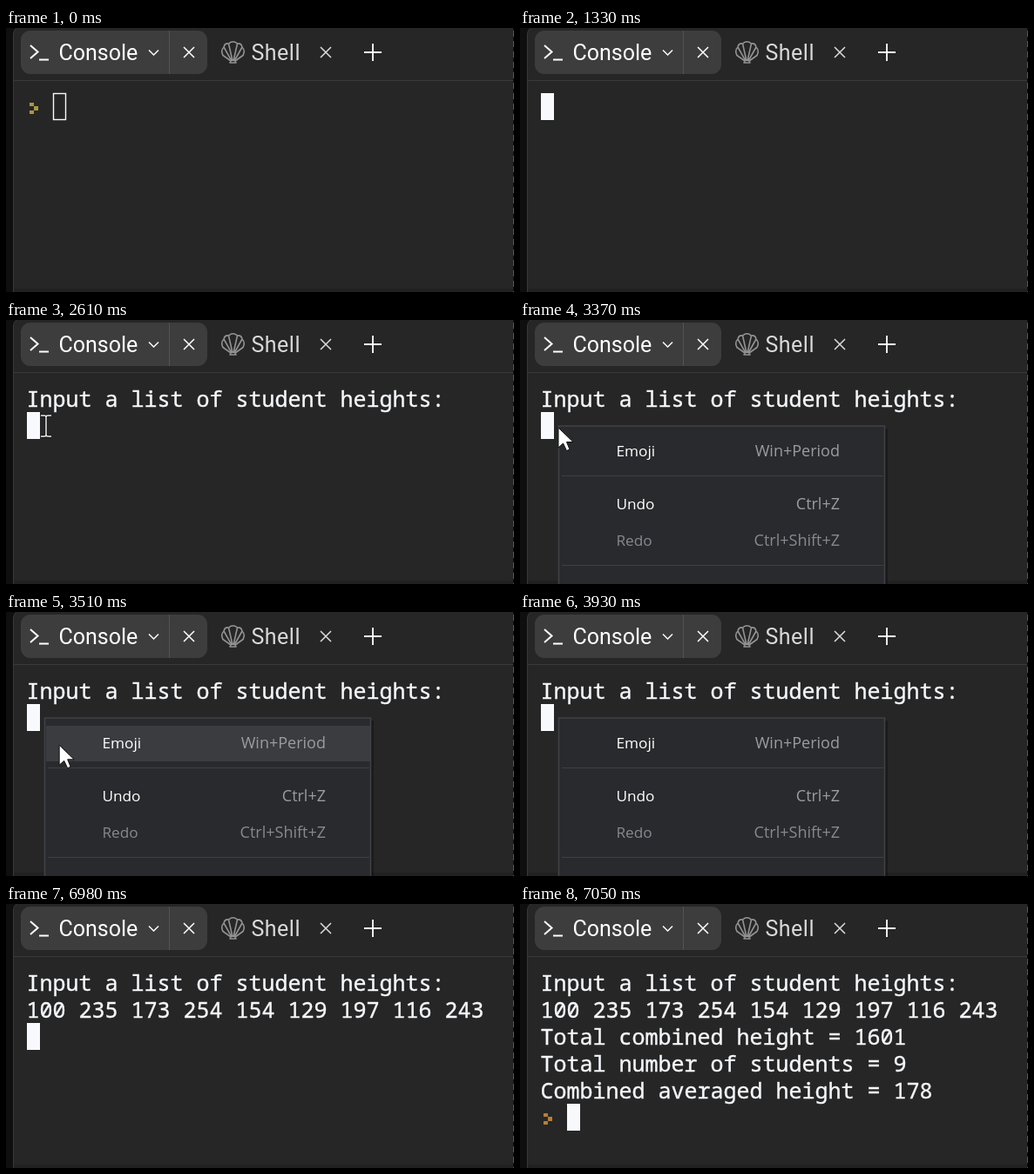
Animation of 583 by 304 pixels, one loop 9.7 s. Source, as an HTML page:

```html
<!DOCTYPE html>
<html lang="en">
<head>
<meta charset="utf-8">
<title>Console</title>
<style>
html, body { margin: 0; width: 100%; height: 100%; overflow: hidden; background: #262626; }
svg { display: block; width: 583px; height: 304px; }
.ui { font: 25px "IBM Plex Sans", Roboto, sans-serif; }
.term { font: 25px "Noto Sans Mono", "DejaVu Sans Mono", monospace; fill: #f5f7fa; stroke: #f5f7fa; stroke-width: .4; }
.label { font: 17.2px "Open Sans", "Noto Sans", sans-serif; fill: #fff; }
.key { font: 18px "Open Sans", "Noto Sans", sans-serif; fill: #9b9ca0; text-anchor: end; }
.off { fill: #858a90; }
.line { fill: none; stroke: #fff; stroke-width: 1.5; }
</style>
</head>
<body>
<svg viewBox="0 0 583 304">
  <rect width="583" height="304" fill="#0f0f0f"/>
  <path d="M8.5 305V8Q8.5 1 14-1H584V305Z" fill="#262626" stroke="#383838"/>
  <rect x="9" y="300" width="573" height="4" fill="#212121"/>
  <path d="M9 60.5H582" stroke="#3a3a3a"/>
  <path d="M582.5 0V304" stroke="#0d0d0d"/>
  <path d="M582.5 3V304" stroke="#565656" stroke-dasharray="7 5"/>

  <rect x="17" y="3" width="214" height="50" rx="11" fill="#3d3d3d"/>
  <path d="M187.5 3V53" stroke="#535353"/>
  <path class="line" d="M28 20L36.5 27.5L28 35M38 36.5H49" style="stroke-width:2"/>
  <text class="ui" x="60.5" y="37" fill="#fff">Console</text>
  <path class="line" d="M164 25.5L169.5 31L175 25.5"/>
  <path class="line" d="M204 22L216 34M216 22L204 34"/>
  <g fill="none" stroke="#939393" stroke-width="1.6" stroke-linejoin="round">
    <path d="M258 38L249 31.500Q246 26 250 22Q251 17 255.500 18Q260.500 13.500 265.500 18Q270 17 271 22Q275 26 272 31.500L263 38L264 40H257Z"/>
    <path d="M259 38L250 22M260 38L255.500 18M261 38L265.500 18M262 38L271 22"/>
  </g>
  <text class="ui" x="281.5" y="37" fill="#d9d9d9" letter-spacing=".5">Shell</text>
  <path class="line" d="M361 22L373 34M373 22L361 34" style="stroke:#ddd"/>
  <path class="line" d="M411 28H431M421 18V38" style="stroke-width:1.8"/>

  <g id="term"></g>
  <path id="prompt" d="M27 86h5v4h-5zM32 90h5v5h-5zM27 95h5v4h-5z"/>
  <rect id="block" width="15" height="31" fill="#f7f9fd"/>
  <rect id="hollow" x="54.5" y="75.5" width="14" height="30" fill="none" stroke="#f7f9fd" stroke-width="1.4"/>

  <g id="menu">
    <rect x="46" y="125" width="376" height="190" fill="#000" opacity=".3"/>
    <rect x="44.500" y="122" width="374" height="190" fill="#292a2d" stroke="#414246" stroke-width="1.5"/>
    <rect id="hover" x="46" width="372" height="41" fill="#3b3c40"/>
    <path d="M48 179.500H417M48 282.500H417" stroke="#3f4044"/>
    <g id="items"></g>
  </g>
  <g id="beam" fill="none">
    <path d="M-6-12H-2Q0-12 0-10Q0-12 2-12H6M0-10V10M-6 12H-2Q0 12 0 10Q0 12 2 12H6" stroke="#111" stroke-width="3"/>
    <path d="M-6-12H-2Q0-12 0-10Q0-12 2-12H6M0-10V10M-6 12H-2Q0 12 0 10Q0 12 2 12H6" stroke="#eee" stroke-width="1.5"/>
  </g>
  <path id="arrow" d="M0 0V23L5.500 18L9.500 26.500L13 25L9.500 16.500H17Z" fill="#fff" stroke="#111"/>
</svg>
<script>
const LOOP = 9700, ROW = 31;
const $ = id => document.getElementById(id);
const show = (id, on) => $(id).style.display = on ? "" : "none";
const move = (id, x, y) => $(id).setAttribute("transform", `translate(${x} ${y})`);

function addText(parent, text, x, y, cls) {
  const el = document.createElementNS("http://www.w3.org/2000/svg", "text");
  el.setAttribute("x", x);
  el.setAttribute("y", y);
  el.setAttribute("class", cls);
  el.textContent = text;
  $(parent).append(el);
  return el;
}

// [time shown, text]
const lines = [
  [1390, "Input a list of student heights:"],
  [4990, "100 235 173 254 154 129 197 116 243"],
  [7050, "Total combined height = 1601"],
  [7050, "Total number of students = 9"],
  [7050, "Combined averaged height = 178"]
].map(([at, text], i) => ({ at, el: addText("term", text, 23.5, 100 + i * ROW, "term") }));

[["Emoji", "Win+Period", 157, ""], ["Undo", "Ctrl+Z", 218, ""], ["Redo", "Ctrl+Shift+Z", 260, " off"]]
  .forEach(([name, key, y, off]) => {
    addText("items", name, 110.5, y, "label" + off);
    addText("items", key, 367, y, "key" + off);
  });

// [time, column, row] of the text cursor
const caret = [[0, 2, 0], [1330, 0, 0], [1390, 0, 1], [4990, 35, 1], [6980, 0, 2], [7050, 2, 5]];
const fade = [[0, 0], [2810, .4], [2910, .8], [3010, 1], [4790, .6], [4890, .25], [4990, 0]];
const beamPath = [[0, 10, 90], [.4, 36, 98], [.7, 58, 110], [1, 46, 122]];
const arrowPath = [[0, 44, 124], [.35, 68, 165], [.7, 104, 235], [1, 135, 306]];

const at = (table, t) => table.filter(row => row[0] <= t).pop();
const stepped = (t, start, end, n) =>
  Math.max(0, Math.min(1, Math.floor((t - start) / (end - start) * n + 1e-6) / n));

function along(path, u) {
  const i = Math.max(1, path.findIndex(p => p[0] >= u));
  const [a, x, y] = path[i - 1], [b, x2, y2] = path[i];
  const k = (u - a) / (b - a);
  return [x + (x2 - x) * k, y + (y2 - y) * k];
}

function draw(t) {
  lines.forEach(l => l.el.style.display = t >= l.at ? "" : "none");

  const [, col, row] = at(caret, t);
  move("block", 24 + col * 15, 75 + row * ROW);
  show("block", t >= 870);
  show("hollow", t < 870);

  show("prompt", t < 1330 || t >= 7050);
  move("prompt", 0, t < 1330 ? 0 : 5 * ROW);
  $("prompt").setAttribute("fill", t < 1330 ? "#ad963f" : "#b57f35");

  show("beam", t >= 1920 && t < 2810);
  move("beam", ...along(beamPath, stepped(t, 1920, 2610, 10)));

  const [x, y] = t < 3370 ? [46, 122] : along(arrowPath, stepped(t, 3370, 3930, 8));
  show("arrow", t >= 2810 && t < 3930);
  move("arrow", x, y);

  const alpha = at(fade, t)[1];
  show("menu", alpha > 0);
  $("menu").setAttribute("opacity", alpha);
  const top = y > 131 && y < 172 ? 131 : y > 191 && y < 233 ? 191 : 0;
  show("hover", top > 0);
  $("hover").setAttribute("y", top);
}

const start = performance.now();
function tick() {
  draw((performance.now() - start) % LOOP);
  requestAnimationFrame(tick);
}
tick();
</script>
</body>
</html>
```
